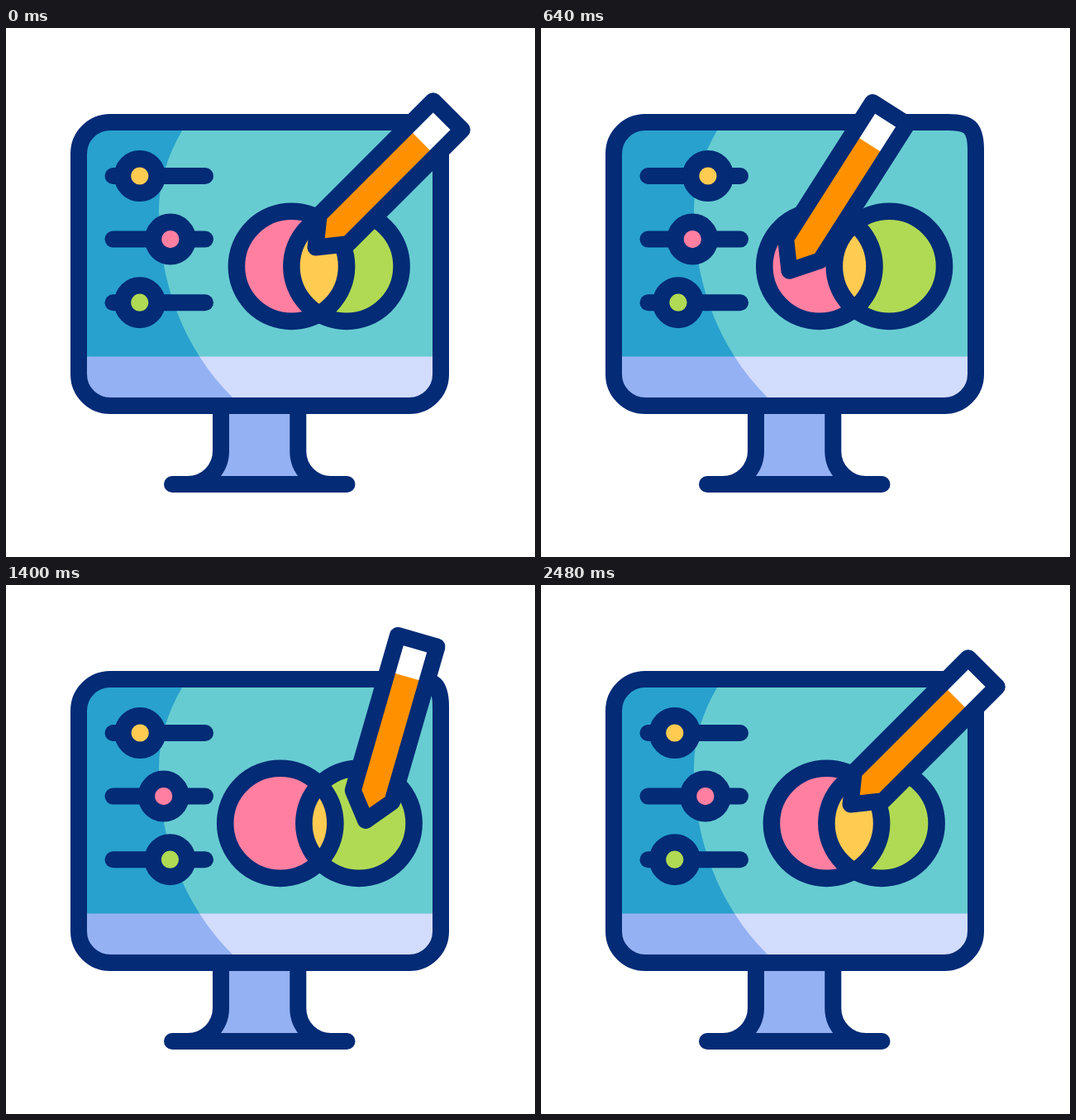
These frames come from a looping animation (640 by 640 pixels, 3 s). An HTML page with a canvas:

```html
<!DOCTYPE html>
<html lang="en">
<head>
<meta charset="utf-8">
<title>Design monitor</title>
<style>
  html, body { margin: 0; width: 100%; height: 100%; overflow: hidden; background: #fff; }
  canvas { display: block; width: 100vw; height: 100vh; }
</style>
</head>
<body>
<canvas id="stage" width="640" height="640"></canvas>
<script>
const ctx = document.getElementById('stage').getContext('2d');
const LOOP = 3000, STEP = 40, LINE = 20;
const NAVY = '#032b76', TEAL = '#67ccd1', BLUE = '#28a1ce', PALE = '#d2dcfc', LILAC = '#94b1f3',
      PINK = '#ff7fa1', YELLOW = '#ffcb51', GREEN = '#b0da53', ORANGE = '#ff9100';

const frame = new Path2D('M126 114H492C518 114 526 120 526 147V419A38 38 0 0 1 488 457H126A38 38 0 0 1 88 419V152A38 38 0 0 1 126 114Z');
const shade = new Path2D('M80 124H213C195 155 185 187 185 222C185 305 213 386 274 447V460H80Z');
const stand = new Path2D('M220 552C242 552 260 534 260 512V457H353.3V512C353.3 534 371 552 393 552');
const foot = new Path2D('M201 552H412.5');
// Pencil with its tip at the origin, pointing down
const pencil = new Path2D('M0 0L-24.75 -30.7V-226H24.75V-30.7Z');

// The pencil rests, then visits the left and right circles
const rest = { x: 374.5, y: 265.5, angle: 45 };
const left = { x: 296.5, y: 292.5, angle: 32 };
const right = { x: 436, y: 285, angle: 16 };
const strokes = [
  { from: rest, to: left, start: 118, end: 711, bowX: 6, bowY: 15.5 },
  { from: left, to: right, start: 820, end: 1430, bowX: 0, bowY: -4 },
  { from: right, to: rest, start: 1595, end: 2290, bowX: 5, bowY: 9 }
];

const mix = (a, b, k) => a + (b - a) * k;

function ease(t, start, end) {
  const u = Math.min(1, Math.max(0, (t - start) / (end - start)));
  return u * u * (3 - 2 * u);
}

// Rises from 0 to 1, holds, and returns to 0
const outAndBack = (t, out, back, duration) =>
  ease(t, out, out + duration) - ease(t, back, back + duration);

function pencilPose(t) {
  const { from, to, start, end, bowX, bowY } = strokes.findLast(s => t >= s.start) || strokes[0];
  const k = ease(t, start, end);
  const bow = 4 * k * (1 - k);
  return {
    x: mix(from.x, to.x, k) + bowX * bow,
    y: mix(from.y, to.y, k) + bowY * bow,
    angle: mix(from.angle, to.angle, k)
  };
}

const disc = (x, y, r) => {
  const path = new Path2D();
  path.arc(x, y, r, 0, Math.PI * 2);
  return path;
};
const fill = (path, color) => { ctx.fillStyle = color; ctx.fill(path); };
const outline = (path, width = LINE) => { ctx.lineWidth = width; ctx.stroke(path); };
const screen = (top, bottom) => {
  ctx.fillStyle = top;
  ctx.fillRect(80, 110, 460, 288);
  ctx.fillStyle = bottom;
  ctx.fillRect(80, 397.5, 460, 64);
};

function drawMonitor() {
  fill(stand, LILAC);
  outline(stand);
  outline(foot);
  ctx.save();
  ctx.clip(frame);
  screen(TEAL, PALE);
  ctx.clip(shade);
  screen(BLUE, LILAC);
  ctx.restore();
  outline(frame);
}

function drawSlider(row, color, x) {
  const y = 179 + row * 76.6;
  outline(new Path2D(`M129.5 ${y}H241`));
  const knob = disc(x, y, 20.8);
  fill(knob, color);
  outline(knob, 20.4);
}

function drawCircles(spread) {
  const pink = disc(345.5 - 13.7 * spread, 288.3, 66.6);
  const green = disc(412 + 15 * spread, 288.3, 66.6);
  fill(pink, PINK);
  fill(green, GREEN);
  ctx.save();
  ctx.clip(pink);
  fill(green, YELLOW);
  ctx.restore();
  outline(pink, 20.6);
  outline(green, 20.6);
}

function drawPencil({ x, y, angle }) {
  ctx.save();
  ctx.translate(x, y);
  ctx.rotate(angle * Math.PI / 180);
  fill(pencil, ORANGE);
  ctx.fillStyle = '#fff';
  ctx.fillRect(-20, -222, 40, 41);
  outline(pencil);
  ctx.restore();
}

function draw(t) {
  ctx.fillStyle = '#fff';
  ctx.fillRect(0, 0, 640, 640);
  ctx.strokeStyle = NAVY;
  ctx.lineCap = ctx.lineJoin = 'round';

  drawMonitor();
  drawSlider(0, YELLOW, mix(161.8, 202.2, outAndBack(t, 160, 930, 500)));
  drawSlider(1, PINK, mix(198.9, 170.3, outAndBack(t, 280, 960, 680)));
  drawSlider(2, GREEN, mix(161.8, 199, outAndBack(t, 550, 1370, 430)));
  drawCircles(outAndBack(t, 200, 1430, 750));
  drawPencil(pencilPose(t));
}

const began = performance.now();
function tick() {
  const t = (performance.now() - began) % LOOP;
  draw(Math.floor(t / STEP) * STEP);
  requestAnimationFrame(tick);
}
tick();
</script>
</body>
</html>
```
